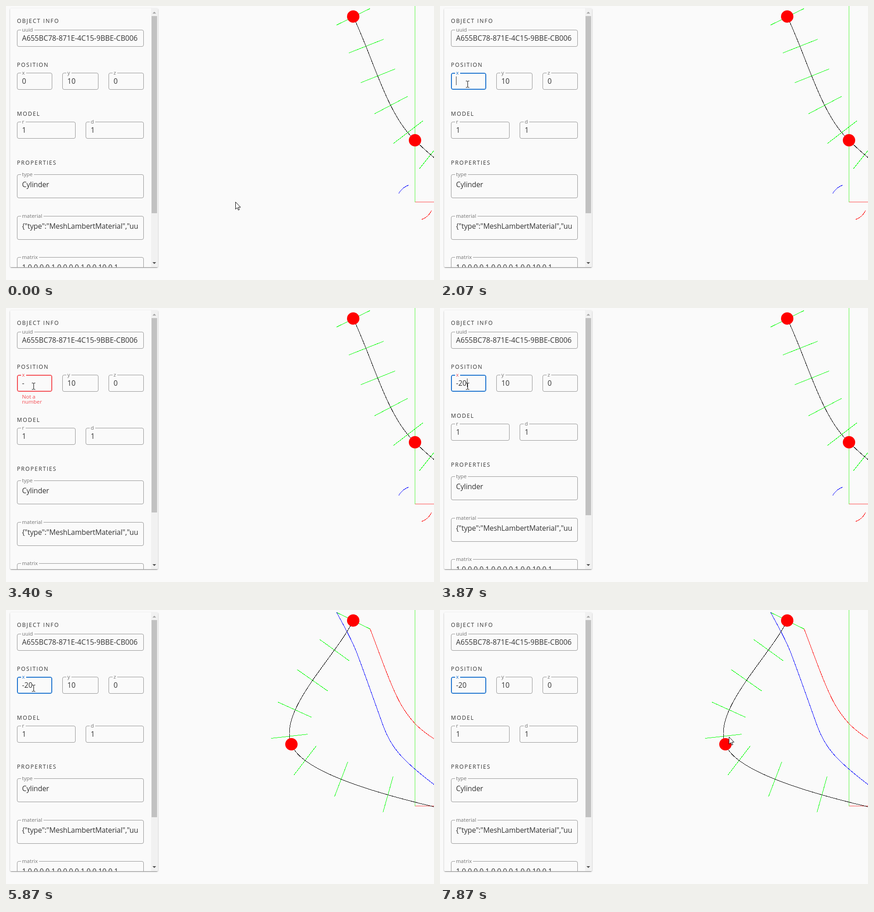
An HTML page that plays this animation: 935 px wide and 599 px high, repeating every 8000 ms.

```html
<!DOCTYPE html>
<html lang="en">
<head>
<meta charset="utf-8">
<title>Object inspector</title>
<style>
html, body { margin: 0; width: 100%; height: 100%; overflow: hidden; background: #fafafa; }
body { position: relative; font-family: "Open Sans", "Noto Sans", sans-serif; }
svg { position: absolute; left: 0; top: 0; }
#scene path { fill: none; shape-rendering: crispEdges; }
#panel, #shade {
  position: absolute; left: 9px; top: 5px; width: 323px; height: 566px;
  border-radius: 3px; background: #fafafa;
}
#panel { overflow: hidden; }
#shade { box-shadow: 0 1px 3px rgba(0,0,0,.28), 0 2px 1px -1px rgba(0,0,0,.2), 0 1px 1px rgba(0,0,0,.14); }
/* children use stage coordinates */
#form { position: absolute; left: -9px; top: -5px; }
#lower { position: absolute; left: 0; top: 0; }
h2 {
  position: absolute; left: 24px; margin: 0; white-space: nowrap;
  font: 400 12px/18px "Open Sans", "Noto Sans", sans-serif; letter-spacing: 1.85px; color: #303030;
}
.field { position: absolute; box-sizing: border-box; border: 1px solid #949494; border-radius: 4px; }
.field label {
  position: absolute; left: 8px; top: -9px; padding: 0 3px 0 2px; background: #fafafa;
  font-size: 11.4px; line-height: 16px; white-space: nowrap; color: #757575;
}
.field span {
  position: absolute; left: 10px; right: 11px; top: 6px; overflow: hidden;
  font-size: 15.7px; line-height: 22px; white-space: nowrap; color: #333;
}
.field .prose { letter-spacing: -.13px; }
#caret { position: absolute; top: 154px; width: 1px; height: 19px; background: #333; }
#hint {
  position: absolute; left: 35px; top: 188px; color: #f44a50;
  font-size: 11.6px; line-height: 11px; white-space: pre;
}
#track { position: absolute; left: 317px; top: 5px; width: 15px; height: 566px; background: #f1f1f1; }
#thumb { position: absolute; left: 318px; top: 22px; width: 12px; background: #c1c1c1; }
</style>
</head>
<body>
<svg id="scene" width="935" height="599">
  <path d="M893.5 0V428.5" stroke="#55f53c"/>
  <path d="M893.5 428.5H935" stroke="#f44"/>
  <g id="before" transform="translate(.5 .5)">
    <path stroke="#00f" d="M857 410Q864 397 879 391"/>
    <path stroke="#f00" d="M908 466Q922 461 929 447"/>
    <path stroke="#000" d="M758 23C798 103 831 237 893 293C905 305 920 319 936 332"/>
  </g>
  <g id="after" transform="translate(.5 .5)">
    <path stroke="#00f" d="M722 5C734 28 752 58 765 91S808 210 824 254S862 326 936 382"/>
    <path stroke="#f00" d="M795 41C810 80 827 128 841 161S866 218 893 248C906 261 920 272 936 282"/>
    <path stroke="#000" d="M758 23C718 103 593 220 623 293C645 355 825 404 936 430"/>
  </g>
  <circle cx="758.5" cy="23" r="13.5" fill="#f00"/>
  <circle id="knot" cy="293.5" r="13.5" fill="#f00"/>
</svg>

<div id="shade"></div>
<div id="panel"><div id="form">
  <div id="lower"></div>
  <div id="hint">Not a
number</div>
  <div id="caret"></div>
  <div id="track"></div>
  <div id="thumb"></div>
  <svg width="340" height="599"><path d="M320 16.5h8l-4-4z" fill="#a3a3a3"/><path d="M320 560h8l-4 4z" fill="#505050"/></svg>
</div></div>

<svg width="935" height="599">
  <path id="arrow" d="M.5.5V16.2L4.1 12.9 6.5 18.2 8.8 17.2 6.5 12H11.4Z" fill="#fff" stroke="#000"/>
  <path id="beam" d="M-3.5-7H-1L.5-6 2-7H4M.5-6V6M-3.5 7H-1L.5 6 2 7H4" fill="none" stroke="#000"/>
</svg>

<script>
const LOOP = 8000, FPS = 15;
const $ = id => document.getElementById(id);
const form = $('form'), lower = $('lower');

function add(parent, tag, text, style) {
  const el = document.createElement(tag);
  el.textContent = text;
  Object.assign(el.style, style);
  return parent.appendChild(el);
}

for (const [text, y] of [['OBJECT INFO', 24], ['POSITION', 120], ['MODEL', 227], ['PROPERTIES', 334]])
  add(y > 200 ? lower : form, 'h2', text, { top: y + 'px' });

const fields = [
  ['uuid', 'A655BC78-871E-4C15-9BBE-CB006', 24, 52, 277, 37],
  ['x', '0', 24, 146, 77, 37],
  ['y', '10', 123, 146, 79, 37],
  ['z', '0', 224, 146, 77, 37],
  ['r', '1', 24, 253, 128, 37],
  ['d', '1', 174, 253, 127, 37],
  ['type', 'Cylinder', 24, 368, 277, 52],
  ['material', '{"type":"MeshLambertMaterial","uuid"', 24, 459, 277, 52],
  ['matrix', '1,0,0,0,0,1,0,0,0,0,1,0,0,10,0,1', 24, 549, 277, 52]
].map(([name, text, x, y, w, h]) => {
  const box = add(y > 200 ? lower : form, 'div', '',
    { left: x + 'px', top: y + 'px', width: w + 'px', height: h + 'px' });
  box.className = 'field';
  const label = add(box, 'label', name);
  const value = add(box, 'span', text, { top: h > 40 ? '10px' : '6px' });
  if (/[a-z]/.test(text)) value.className = 'prose';
  return { box, label, value, x, y, w, h };
});
const input = fields[1];
// keep the overlays above the fields
form.append($('hint'), $('caret'), $('track'), $('thumb'), form.querySelector('svg'));

function ticks(group, list) {
  const path = document.createElementNS('http://www.w3.org/2000/svg', 'path');
  path.setAttribute('stroke', '#0f0');
  path.setAttribute('d', list.map(([a, b, c, d]) => `M${a} ${b}L${c} ${d}`).join(''));
  group.prepend(path);
}
ticks($('before'), [[722, 41, 795, 5], [749, 102, 825, 72], [775, 167, 850, 137],
  [805, 235, 877, 197], [846, 300, 911, 250], [902, 356, 950, 296]]);
ticks($('after'), [[722, 5, 795, 41], [685, 64, 750, 111], [636, 130, 703, 177], [594, 201, 667, 234],
  [579, 280, 659, 271], [628, 361, 677, 297], [717, 408, 746, 332], [823, 442, 845, 364]]);

const GREY = [117, 117, 117], BLUE = [25, 113, 206], RED = [244, 74, 80];
const clamp = v => Math.max(0, Math.min(1, v));
const smooth = v => v * v * (3 - 2 * v);
const rgb = c => `rgb(${c.map(Math.round)})`;
const fade = (a, b, k) => rgb(a.map((v, i) => v + (b[i] - v) * smooth(clamp(k))));
const bezier = (k, a, b, c, d) => {
  const m = 1 - k;
  return m * m * m * a + 3 * m * m * k * b + 3 * m * k * k * c + k * k * k * d;
};

// time, text, caret x
const typing = [[0, '0', 43], [1870, '', 35], [2800, '-', 41], [3800, '-2', 50], [3870, '-20', 59]];
// caret shown between each pair
const blinks = [[1000, 1530], [2070, 2600], [2800, 3400], [3800, 4400], [4930, 5470], [6000, 6530], [7070, 7600]];

function pointer(step) {
  if (step < 15) {
    const k = smooth(clamp(step / 13));
    return [bezier(k, 501, 330, 80, 60), bezier(k, 428, 200, 100, 169)];
  }
  if (step < 106) return [60, 171];
  const out = smooth(clamp((step - 105) / 10)), back = smooth(clamp((step - 115) / 3));
  return [60 + 576 * out - 5 * back, 171 + 125 * out - 19 * back];
}

function draw(t) {
  const [px, py] = pointer(Math.floor((t + 4) * FPS / 1000)).map(Math.round);
  const error = t >= 2800 && t < 3800, focus = t >= 1000, moved = t >= 5870;
  let over = false;

  for (const f of fields) {
    const hit = px >= f.x && px < f.x + f.w && py >= f.y && py < f.y + f.h;
    over = over || hit;
    f.box.style.borderColor = hit ? '#212121' : '#949494';
  }

  const edge = rgb(error ? RED : BLUE);
  if (focus) input.box.style.borderColor = edge;
  input.box.style.boxShadow = focus ? `inset 0 0 0 1px ${edge}` : 'none';
  input.label.style.color =
    t < 2800 ? fade(GREY, BLUE, (t - 1000) / 250) :
    t < 3800 ? fade(BLUE, RED, (t - 2800) / 400) : fade(RED, BLUE, (t - 3800) / 330);

  const [, text, caretX] = typing.filter(s => t >= s[0]).pop();
  input.value.textContent = text;
  $('caret').style.left = caretX + 'px';
  $('caret').hidden = !blinks.some(([a, b]) => t >= a && t < b);

  $('hint').hidden = !error;
  lower.style.top = error ? '9px' : '0';
  $('thumb').style.height = error ? '425px' : '431px';

  $('before').style.display = moved ? 'none' : '';
  $('after').style.display = moved ? '' : 'none';
  $('knot').setAttribute('cx', moved ? 623.5 : 893.5);

  $('arrow').style.display = over ? 'none' : '';
  $('beam').style.display = over ? '' : 'none';
  $(over ? 'beam' : 'arrow').setAttribute('transform', `translate(${px} ${py})`);
}

const start = performance.now();
function tick() {
  draw((performance.now() - start) % LOOP);
  requestAnimationFrame(tick);
}
tick();
</script>
</body>
</html>
```
